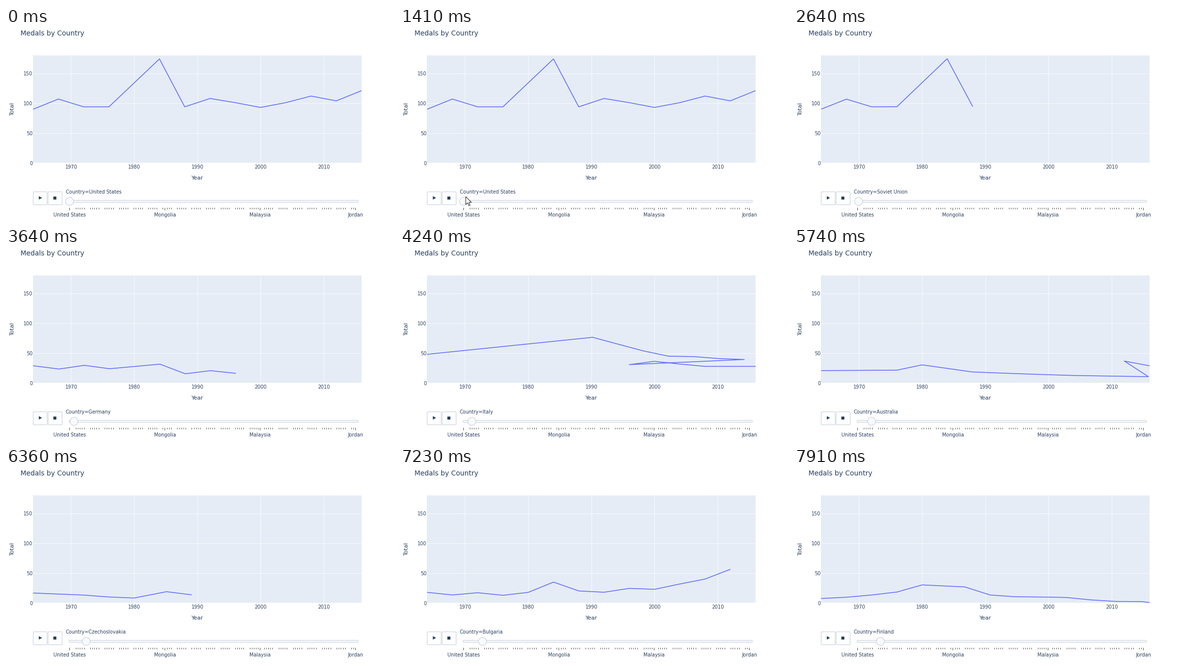
Animation of 778 by 385 pixels, one loop 7990 ms. Source, as a matplotlib script:

```python
import numpy as np
import matplotlib.pyplot as plt
from matplotlib.animation import FuncAnimation
from matplotlib.patches import Circle, FancyBboxPatch, Polygon, Rectangle

W, H, DPI = 778, 385, 100
FRAMES, INTERVAL = 470, 17
PT = 72 / DPI                      # points per pixel
INK, EDGE, PALE = "#2a3f5f", "#bec8d9", "#f8fafc"
LEFT, RIGHT, TOP, BASE = 54.4, 713, 54.8, 271
FIRST, LAST = 1964, 2016

START, PERIOD, MORPH, SLIDE = 2570, 513, 500, 150
GRIP_X, GRIP_Y, STEP = 127.5, 347.7, 4.152


def px(year):
    return LEFT + (year - FIRST) * (RIGHT - LEFT) / (LAST - FIRST)


def py(total):
    return BASE - total * (BASE - TOP) / 180


def series(trend, boom=0, wobble=0, east=False, missed=(), last=LAST):
    """Evenly spaced trend points, plus a boom at the games rivals boycotted."""
    years = np.arange(FIRST, last + 1, 4)
    totals = np.interp(years, np.linspace(FIRST, last, len(trend)), trend)
    totals += boom * (years == (1980 if east else 1984))
    here = ~np.isin(years, [*missed, 1984] if east else list(missed))
    years, totals = years[here], totals[here]
    totals += wobble * (-1.0) ** np.arange(len(years))
    return np.column_stack([px(years), py(totals)])


CURVES = {
    "United States": series([90, 107, 94, 94, 94, 94, 94, 108, 101, 93, 101,
                             112, 104, 121], boom=80, missed=[1980]),
    "Soviet Union": series([94, 98, 125, 132], boom=70, east=True, last=1988),
    "Japan": series([26, 27, 17, 22, 40], boom=7, wobble=3, missed=[1980]),
    "Germany": series([50, 66, 87, 48, 41], missed=range(1968, 1992, 4)),
    "Italy": series([25, 16, 14, 15, 38, 28, 28], boom=17),
    "Hungary": series([25, 29, 27, 15, 14], boom=4, east=True),
    "Poland": series([21, 22, 18, 12, 10], boom=10, east=True, missed=[2012]),
    "Australia": series([18, 15, 5, 20, 56, 46, 29], boom=14),
    "Czechoslovakia": series([14, 8, 8, 7], boom=6, east=True, last=1992),
    "Great Britain": series([16, 15, 19, 27, 67], boom=20, wobble=2),
    "Bulgaria": series([9, 13, 23, 33, 38, 13, 13, 12, 3, 3], boom=10,
                       east=True),
    "Finland": series([5, 8, 4, 1], boom=4),
}
NAMES, PATHS = list(CURVES), list(CURVES.values())


def ease(u):
    u = min(max(u, 0), 1)
    return 4 * u**3 if u < 0.5 else 1 - 4 * (1 - u) ** 3


def morph(a, b, s):
    """Blend matching points; surplus points of b appear at once."""
    out = b.copy()
    n = min(len(a), len(b))
    out[:n] = a[:n] + (b[:n] - a[:n]) * s
    return out


fig = plt.figure(figsize=(W / DPI, H / DPI), dpi=DPI, facecolor="white")
ax = fig.add_axes([0, 0, 1, 1])
ax.set(xlim=(0, W), ylim=(H, 0))
ax.axis("off")


def label(x, y, s, size=9.6, ha="center", va="baseline", **kw):
    return ax.text(x, y, s, fontsize=size * PT, family="DejaVu Sans",
                   color=INK, ha=ha, va=va, **kw)


def box(x0, y0, x1, y1, fill):
    ax.add_patch(FancyBboxPatch(
        (x0, y0), x1 - x0, y1 - y0, fc=fill, ec=EDGE, lw=0.9 * PT,
        boxstyle="round,pad=0,rounding_size=1.6"))


# Chart
plot = Rectangle((54, TOP), RIGHT - 54, BASE - TOP, fc="#e5ecf6", lw=0)
ax.add_patch(plot)
for year in range(1970, 2011, 10):
    ax.plot([px(year)] * 2, [TOP, BASE], color="white", lw=0.8 * PT)
    label(px(year) + 0.3, 282.3, str(year))
for total in range(0, 151, 50):
    ax.plot([54, RIGHT], [py(total)] * 2, color="white",
            lw=(0.8 if total else 1.6) * PT)
    label(53.6, py(total) + 3.7, str(total), ha="right")
label(29, 15.2, "Medals by Country", 13.6, "left")
label(383, 304, "Year", 11.2)
label(13, 163, "Total", 11.2, va="center", rotation=90)
curve, = ax.plot([], [], color="#636efa", lw=1.6 * PT,
                 solid_capstyle="butt", solid_joinstyle="round")
curve.set_clip_path(plot)

# Buttons
box(54.5, 328.5, 82.5, 354.5, "white")
box(84.5, 328.5, 112.5, 354.5, "white")
ax.add_patch(Polygon([(65.8, 337.2), (72.3, 340.6), (65.8, 344)],
                     fc=INK, lw=0))
ax.add_patch(Rectangle((95.4, 338.2), 5.6, 5.6, fc=INK, lw=0))

# Slider
box(126.5, 345.5, 706.5, 349.6, PALE)
slots = np.arange(139)
major = slots % 46 == 0
shown = major | np.isin(slots % 7, [0, 3, 4, 5, 6])
ax.vlines(GRIP_X + STEP * slots[shown], 360,
          np.where(major, 365, 363)[shown], color="#333333", lw=0.9 * PT)
for i, name in enumerate(["United States", "Mongolia", "Malaysia", "Jordan"]):
    label(GRIP_X + 46 * STEP * i, 378.2, name)
grip = ax.add_patch(Circle((GRIP_X, GRIP_Y), 8, fc=PALE, ec=EDGE,
                           lw=0.9 * PT, zorder=4))
current = label(120, 332.2, "", ha="left")

# Mouse pointer
PLAY = np.array([74, 342])
ARROW = np.array([(0, 0), (0, 16), (3.7, 12.6), (6.2, 18.3), (8.6, 17.2),
                  (6.2, 11.7), (11.3, 11.7)])
HAND = np.array([(-1.5, 1), (0, 0), (1.5, 1), (1.5, 7), (11, 10), (11, 16),
                 (9, 22), (0, 22), (-5.5, 13), (-4, 11.5), (-1.5, 14)])
click = ax.add_patch(Circle(PLAY, 12, fc="#ffff00", lw=0, zorder=5))
pointer = ax.add_patch(Polygon(ARROW, fc="white", ec="black",
                               lw=0.9 * PT, zorder=6))


def move_pointer(t):
    pointer.set_visible(670 <= t < 2240)
    start = np.array([205, 333] if t >= 750 else [194, 331])
    go = np.clip((t - 1010) / 760, 0, 1)
    spot = start + (PLAY - start) * go * go * (3 - 2 * go)
    pointer.set_xy((HAND if spot[0] < 83 else ARROW) + spot)
    click.set_visible(1900 <= t < 2100)
    click.set_alpha(0.47 if t < 2040 else 0.23)


def update(frame):
    t = (frame + 0.5) * INTERVAL
    k, age = divmod(t - START, PERIOD)
    k = int(k) + 1
    if k > 0:
        path = morph(PATHS[k - 1], PATHS[k], ease(age / MORPH))
        slot = k - 1 + ease(age / SLIDE)
    else:
        k, path, slot = 0, PATHS[0], 0
    curve.set_data(*path.T)
    grip.center = (GRIP_X + slot * STEP, GRIP_Y)
    current.set_text("Country=" + NAMES[k])
    move_pointer(t)
    return curve, grip, current, pointer, click


anim = FuncAnimation(fig, update, frames=FRAMES, interval=INTERVAL,
                     repeat=True, repeat_delay=0, blit=False)
plt.show()
```
